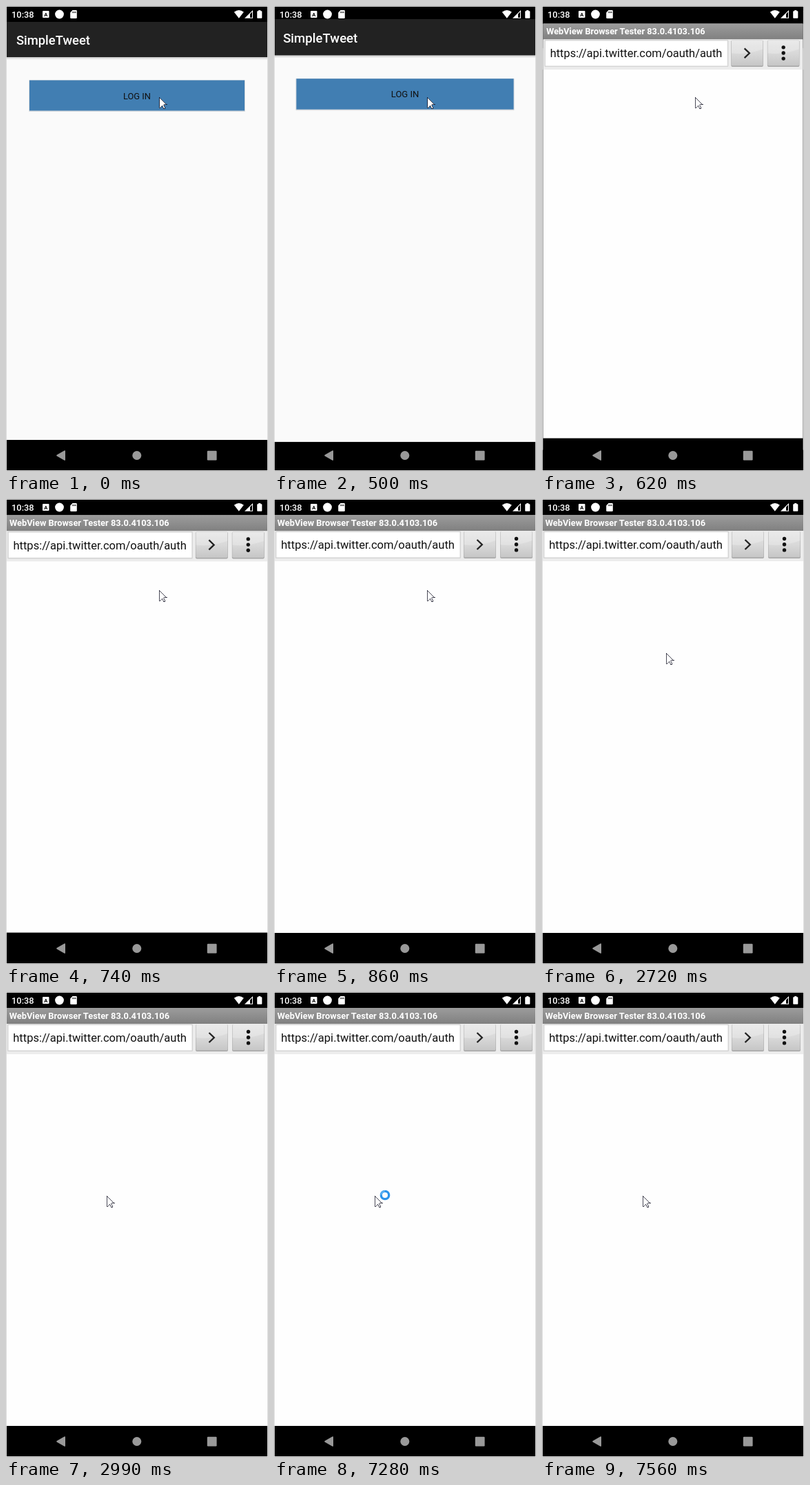
An HTML page that plays this animation: 380x673 px, repeating every 8 s.

```html
<!DOCTYPE html>
<html lang="en">
<head>
<meta charset="utf-8">
<title>Log in</title>
<style>
  @property --zoom { syntax: "<number>"; inherits: false; initial-value: 1; }

  html, body { margin: 0; width: 100%; height: 100%; overflow: hidden; background: #fff; }
  svg { display: block; width: 380px; height: 673px; font-family: Roboto, sans-serif; }

  .window { transform-origin: 190px 336.5px; transform: scale(var(--zoom)); }
  .window, #cursor, #busy { animation: 8s step-end infinite; }
  #login { animation-name: leave; }
  #browser { animation-name: enter; }
  #cursor { animation-name: point; }
  #busy { animation-name: busy; }

  @keyframes leave {
    0% { --zoom: 1; opacity: 1; visibility: visible; }
    6.25% { --zoom: 1.01; opacity: 1; visibility: visible; }
    7.75% { --zoom: 1.05; opacity: .6; visibility: visible; }
    9.25%, 100% { --zoom: 1.05; opacity: .6; visibility: hidden; }
  }
  @keyframes enter {
    0% { --zoom: .9917; visibility: hidden; }
    7.75% { --zoom: .9917; visibility: visible; }
    9.25% { --zoom: .9985; visibility: visible; }
    10.75%, 100% { --zoom: 1; visibility: visible; }
  }
  @keyframes point {
    0% { transform: translate(222px, 131px); }
    34% { transform: translate(180px, 222px); }
    35.5% { transform: translate(150px, 287px); }
    37.375%, 100% { transform: translate(146px, 294px); }
  }
  @keyframes busy {
    0% { visibility: hidden; }
    91% { visibility: visible; }
    94.5%, 100% { visibility: hidden; }
  }
</style>
</head>
<body>
<svg viewBox="0 0 380 673">
  <defs>
    <linearGradient id="titleFill" x2="0" y2="1">
      <stop stop-color="#9c9c9c"/><stop offset="1" stop-color="#808080"/>
    </linearGradient>
    <linearGradient id="keyFill" x2="0" y2="1">
      <stop stop-color="#e4e4e4"/><stop offset=".5" stop-color="#d9d9d9"/><stop offset="1" stop-color="#c6c6c6"/>
    </linearGradient>
    <linearGradient id="shade" x2="0" y2="1">
      <stop stop-color="#000" stop-opacity=".2"/><stop offset="1" stop-color="#000" stop-opacity="0"/>
    </linearGradient>
    <g id="key">
      <rect x=".5" y="1" width="47" height="39" rx="2" fill="#a6a6a6"/>
      <rect x="1" y="1" width="46" height="37.5" rx="1.5" fill="url(#keyFill)"/>
      <path d="M1 2.5Q1 1 2.5 1H45.5Q47 1 47 2.5V14Q24 23 1 20Z" fill="#fff" opacity=".22"/>
    </g>
  </defs>

  <rect width="380" height="673"/>

  <g id="login" class="window">
    <rect width="380" height="673"/>
    <rect y="23" width="380" height="605" fill="#fafafa"/>
    <rect y="23" width="380" height="51" fill="#222"/>
    <rect y="74" width="380" height="4" fill="url(#shade)"/>
    <text x="14.9" y="55.5" font-size="18.4" font-weight="500" fill="#fff">SimpleTweet</text>
    <rect x="33" y="107" width="314" height="46" rx="1" fill="#d9dcdf"/>
    <rect x="34" y="107.5" width="312" height="44" fill="#417eb2"/>
    <text x="190" y="134.5" font-size="12.88" text-anchor="middle" fill="#111">LOG IN</text>
  </g>

  <g id="browser" class="window">
    <rect width="380" height="673"/>
    <rect y="23" width="380" height="605" fill="#fefefe"/>
    <rect y="23" width="380" height="23" fill="url(#titleFill)"/>
    <text x="4.7" y="38.7" font-size="12.86" font-weight="700" fill="#fff">WebView Browser Tester 83.0.4103.106</text>
    <rect y="46" width="380" height="44" fill="#ececec"/>
    <rect x="2" y="46.5" width="269" height="39.5" rx="1" fill="#d4d4d4"/>
    <rect x="3.5" y="48" width="266" height="36.5" fill="#fff"/>
    <text x="10.2" y="72.3" font-size="16.56" fill="#111">https://api.twitter.com/oauth/auth</text>
    <use href="#key" x="274.5" y="46"/>
    <use href="#key" x="327.5" y="46"/>
    <path d="M294.5 59L301.8 66L294.5 73" fill="none" stroke="#222" stroke-width="2.3"/>
    <g fill="#111">
      <circle cx="351.5" cy="57.5" r="2.7"/>
      <circle cx="351.5" cy="65.7" r="2.7"/>
      <circle cx="351.5" cy="73.9" r="2.7"/>
    </g>
  </g>

  <!-- Status bar -->
  <g fill="#fff">
    <text x="8" y="16.8" font-size="12.88" font-weight="500">10:38</text>
    <rect x="53" y="7" width="9.5" height="10" rx="1"/>
    <text x="57.75" y="14.8" font-size="7.5" font-weight="700" text-anchor="middle" fill="#000">A</text>
    <circle cx="77.5" cy="12" r="6.4"/>
    <path d="M96.5 6H101.5Q102.8 6 102.8 7.3V16.7Q102.8 18 101.5 18H94.5Q93.2 18 93.2 16.7V9.5Z"/>
    <path d="M96.9 8V10.2M98.9 8V10.2M100.9 8V10.2" stroke="#000"/>
    <path d="M330.8 8.8Q337.8 3.2 344.8 8.8L337.8 17.8Z"/>
    <path d="M346 17.8L358 6V17.8Z"/>
    <path d="M354 11.5L357 8.5V16.8H354Z" fill="#000"/>
    <path d="M366.2 7.2V6H369.2V7.2H370.5Q371.3 7.2 371.3 8V17Q371.3 17.8 370.5 17.8H365Q364.2 17.8 364.2 17V8Q364.2 7.2 365 7.2Z"/>
  </g>

  <!-- Navigation bar -->
  <g fill="#999">
    <path d="M73.6 651.3Q72.7 650.5 73.6 649.7L84.5 643.4Q86 642.7 86 644.2V656.8Q86 658.3 84.5 657.6Z"/>
    <circle cx="189.8" cy="650.5" r="6.5"/>
    <rect x="291.8" y="643.7" width="13.8" height="13.8" rx="1.2"/>
  </g>

  <path id="cursor" d="M.5 .5V16.5L4.5 12.8L7 18.2L8.8 17.3L6.5 11.8H11.5Z"
    fill="#fff" stroke="#112" stroke-width=".75" shape-rendering="crispEdges"/>
  <g id="busy" fill="none">
    <circle cx="161" cy="294" r="5.7" stroke="#2b93ea" stroke-width="3.3"/>
    <path d="M155.3 294A5.7 5.7 0 0 1 161 288.3" stroke="#5cb2f3" stroke-width="2"/>
  </g>

  <rect x=".5" y=".5" width="379" height="672" fill="none" stroke="#dcdcdc"/>
</svg>
</body>
</html>
```
